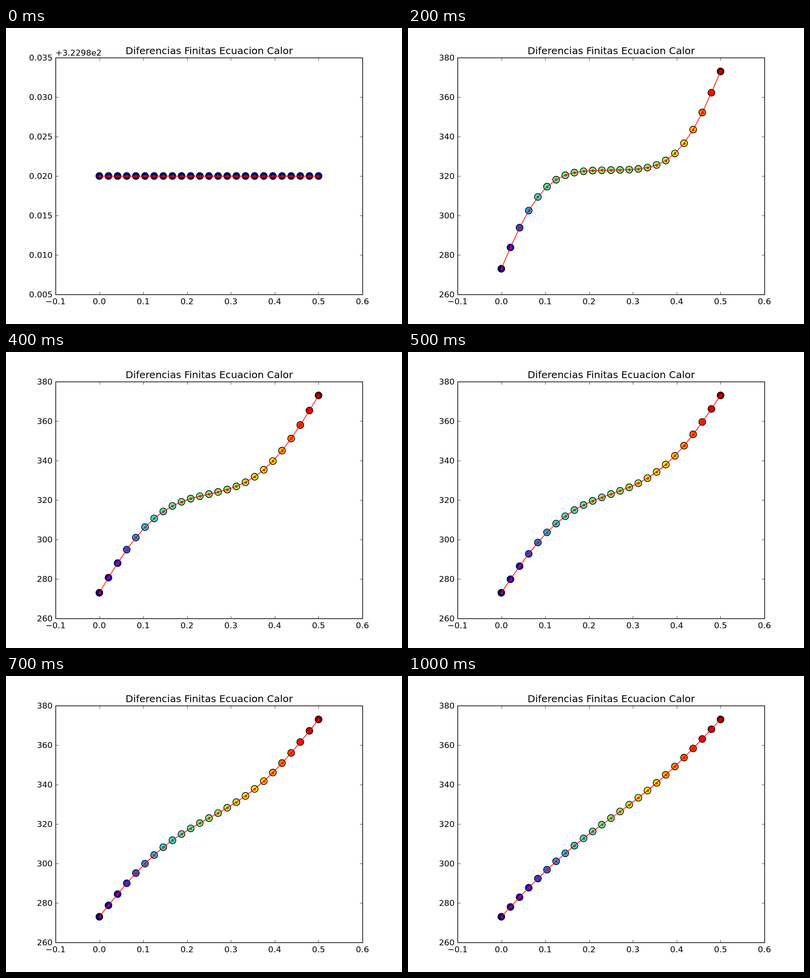
These frames come from a looping animation (800 px wide and 600 px high, 1.1 s). An HTML page with a canvas:

```html
<!DOCTYPE html>
<html lang="es">
<head>
<meta charset="utf-8">
<style>
html, body { margin: 0; width: 100%; height: 100%; overflow: hidden; background: #fff; }
canvas { display: block; }
</style>
</head>
<body>
<canvas id="plot" width="800" height="600"></canvas>
<script>
const ctx = document.getElementById('plot').getContext('2d');
const PT = 100 / 72; // pixels per point
const FRAMES = 11, FRAME_MS = 100, STEPS = 10;
const CELLS = 24, R = 0.34;
const COLD = 273, MID = 323, HOT = 373;
const FONT = '"DejaVu Sans", Verdana, sans-serif';

const snap = v => Math.round(v) + 0.5;
const xPos = x => 100 + (x + 0.1) * 620 / 0.7;
const yPos = temp => 540 - (temp - 260) * 4;

// Explicit finite differences for the heat equation; the ends are fixed after each step
function solve() {
  let u = Array(CELLS + 1).fill(MID);
  const states = [u];
  for (let s = 1; s <= STEPS * (FRAMES - 1); s++) {
    u = u.map((v, i) =>
      i === 0 ? COLD : i === CELLS ? HOT : v + R * (u[i - 1] - 2 * v + u[i + 1]));
    if (s % STEPS === 0) states.push(u);
  }
  return states;
}

function ramp(v, stops) {
  const i = Math.max(1, stops.findIndex(s => v <= s[0]));
  const [a, p] = stops[i - 1], [b, q] = stops[i];
  return Math.round(255 * (p + (q - p) * (v - a) / (b - a)));
}

function jet(v) {
  const r = ramp(v, [[0, 0], [0.35, 0], [0.66, 1], [0.89, 1], [1, 0.5]]);
  const g = ramp(v, [[0, 0], [0.125, 0], [0.375, 1], [0.64, 1], [0.91, 0], [1, 0]]);
  const b = ramp(v, [[0, 0.5], [0.11, 1], [0.34, 1], [0.65, 0], [1, 0]]);
  return `rgb(${r},${g},${b})`;
}

function text(str, x, y, align, size = 12 * PT) {
  ctx.font = `${size}px ${FONT}`;
  ctx.textAlign = align;
  ctx.fillStyle = '#000';
  ctx.fillText(str, x, y);
}

function line(points, color, width) {
  ctx.beginPath();
  points.forEach(([x, y]) => ctx.lineTo(x, y));
  ctx.strokeStyle = color;
  ctx.lineWidth = width;
  ctx.stroke();
}

function disc(x, y, r) {
  ctx.beginPath();
  ctx.arc(x, y, r, 0, 2 * Math.PI);
  ctx.fill();
}

function drawAxes(flat) {
  const tick = 4 * PT, thin = PT / 2;
  for (let i = 0; i < 8; i++) {
    const x = snap(xPos(i / 10 - 0.1));
    line([[x, 540.5], [x, 540.5 - tick]], '#000', thin);
    line([[x, 60.5], [x, 60.5 + tick]], '#000', thin);
    text(((i - 1) / 10).toFixed(1).replace('-', '\u2212'), xPos(i / 10 - 0.1), 560, 'center');
  }
  for (let i = 0; i < 7; i++) {
    const y = 540 - 80 * i;
    line([[100.5, y + 0.5], [100.5 + tick, y + 0.5]], '#000', thin);
    line([[720.5, y + 0.5], [720.5 - tick, y + 0.5]], '#000', thin);
    text(flat ? (0.005 * (i + 1)).toFixed(3) : 260 + 20 * i, 94.2, y + 6, 'right');
  }
  ctx.lineWidth = PT;
  ctx.strokeStyle = '#000';
  ctx.strokeRect(100.5, 60.5, 620, 480);
  if (flat) text('+3.2298e2', 100, 56, 'left');
  text('Diferencias Finitas Ecuacion Calor', 410.5, 53, 'center', 20);
}

function draw(index) {
  const flat = index === 0;
  const points = states[index].map((temp, i) =>
    [xPos(0.5 * i / CELLS), flat ? 300 : yPos(temp), flat ? 0 : (temp - COLD) / (HOT - COLD)]);
  ctx.fillStyle = '#fff';
  ctx.fillRect(0, 0, 800, 600);

  for (const [x, y, heat] of points) {
    ctx.fillStyle = jet(heat);
    disc(x, y, 5 * PT);
    ctx.strokeStyle = '#000';
    ctx.lineWidth = PT;
    ctx.stroke();
  }
  line(flat ? points.map(([x]) => [x, 300.5]) : points, '#f00', PT);
  ctx.fillStyle = '#f00';
  for (const [x, y] of points) disc(snap(x), snap(y), 1.75 * PT);
  drawAxes(flat);
}

const states = solve();
const start = performance.now();

function loop() {
  const t = Math.max(0, performance.now() - start);
  draw(Math.floor(t / FRAME_MS) % FRAMES);
  requestAnimationFrame(loop);
}
loop();
</script>
</body>
</html>
```
